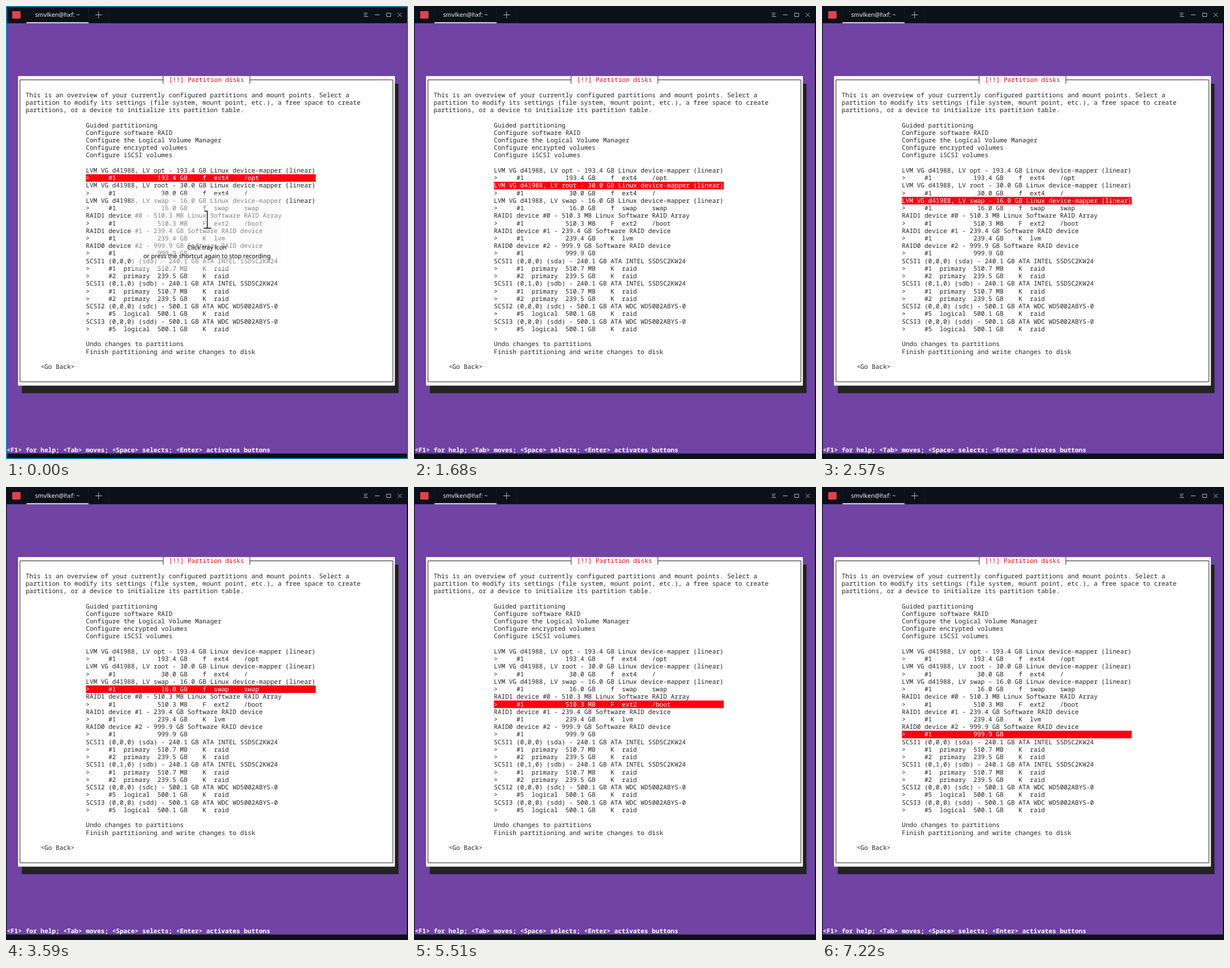
These frames come from a looping animation (706 px wide and 794 px high, 8 s). An HTML page:

```html
<!DOCTYPE html>
<html lang="en">
<head>
<meta charset="utf-8">
<title>Partition disks</title>
<style>
  html, body { margin: 0; width: 706px; height: 794px; overflow: hidden; background: #0c1018; }
  svg { display: block; }
  text { white-space: pre; text-rendering: geometricPrecision; }
  .mono text { font: 11.028px "Noto Sans Mono", "DejaVu Sans Mono", monospace; fill: #222; }
  .mono .title { fill: #f5000f; }
  .mono .help { font-weight: 700; fill: #fff; }
  .mono .on { fill: #fff; }
  .ui { font: 10.65px "Noto Sans", "Open Sans", sans-serif; }
  .icon { fill: none; stroke: #b4b7bc; stroke-width: 1; }
</style>
</head>
<body>
<svg id="stage" width="706" height="794" viewBox="0 0 706 794">
  <rect width="706" height="794" fill="#0c1018"/>

  <rect x="11" y="9" width="14.5" height="13" fill="#e5404c"/>
  <path d="M36.5 1V29M145.5 1V29M180.5 1V29" stroke="#161b24"/>
  <text class="ui" x="51" y="18.8" fill="#f2f2f2">smvlken@hxf: ~</text>
  <path class="icon" d="M157 15.5H169M162.5 9.5V21.5"/>
  <path class="icon" d="M628.5 12.5H635M628.5 15.5H634M628.5 18.5H636M648 15.5H656M668.5 12.5H675.5V18.5H668.5ZM688 12L695 19M695 12L688 19"/>

  <rect x="1.3" y="30.2" width="702.7" height="754.2" fill="#7043a5"/>
  <rect x="36" y="28.5" width="109" height="1.7" fill="#fff"/>

  <g id="term" class="mono"></g>

  <g id="hint">
    <rect x="221.5" y="330" width="263" height="133" rx="4" fill="#f8f8f8" fill-opacity=".45"/>
    <g class="ui" text-anchor="middle">
      <text x="353" y="427">Click tray icon</text>
      <text x="353" y="442">or press the shortcut again to stop recording</text>
    </g>
    <path id="halo" d="M348.5 359.5H353.5V389.5M347 389.5H360.5" fill="none" stroke="#fff" stroke-width="3"/>
    <path d="M348.5 359.5H353.5V389.5M347 389.5H360.5" fill="none" stroke="#000" stroke-width="1.4"/>
    <rect x=".75" y=".75" width="704.5" height="792.5" fill="none" stroke="#0a9bdc" stroke-width="1.5"/>
  </g>
</svg>
<script>
const LOOP = 8000, HINT_END = 50;
const CW = 6.617, CH = 13.234, X0 = 1.35, Y0 = 30.17, BASE = 10.3;
const LIST_COL = 21, LIST_ROW = 13, LIST_COLS = 61, FIRST = 20;
const MOVES = [1680, 2150, 2570, 3590, 4900, 5510, 5970, 6380, 6850, 7220];

const term = document.getElementById('term');
const hint = document.getElementById('hint');
const colX = c => X0 + c * CW;
const rowY = r => Y0 + r * CH;

function add(tag, attrs, content = '') {
  const el = document.createElementNS('http://www.w3.org/2000/svg', tag);
  for (const k in attrs) el.setAttribute(k, attrs[k]);
  el.textContent = content;
  term.append(el);
  return el;
}
const box = (col, row, cols, rows, fill) =>
  add('rect', { x: colX(col), y: rowY(row), width: cols * CW, height: rows * CH, fill });
const print = (col, row, str, cls = '') =>
  add('text', { x: colX(col), y: rowY(row) + BASE, class: cls }, str);

const part = (id, size, flag = '', fs = '', mount = '', kind = '') =>
  ('>     #' + id + '  ' + kind.padEnd(7) + size.padStart(10) + '    ' +
   flag.padEnd(3) + fs.padEnd(8) + mount).trimEnd();
const lvm = (name, size) => `LVM VG d41988, LV ${name} - ${size} Linux device-mapper (linear)`;
const ssd = (pos, dev) => [
  `SCSI1 (${pos}) (${dev}) - 240.1 GB ATA INTEL SSDSC2KW24`,
  part(1, '510.7 MB', 'K', 'raid', '', 'primary'),
  part(2, '239.5 GB', 'K', 'raid', '', 'primary')
];
const hdd = (bus, dev) => [
  `SCSI${bus} (0,0,0) (${dev}) - 500.1 GB ATA WDC WD5002ABYS-0`,
  part(5, '500.1 GB', 'K', 'raid', '', 'logical')
];

const list = [
  'Guided partitioning',
  'Configure software RAID',
  'Configure the Logical Volume Manager',
  'Configure encrypted volumes',
  'Configure iSCSI volumes',
  '',
  lvm('opt', '193.4 GB'), part(1, '193.4 GB', 'f', 'ext4', '/opt'),
  lvm('root', '30.0 GB'), part(1, '30.0 GB', 'f', 'ext4', '/'),
  lvm('swap', '16.0 GB'), part(1, '16.0 GB', 'f', 'swap', 'swap'),
  'RAID1 device #0 - 510.3 MB Linux Software RAID Array',
  part(1, '510.3 MB', 'F', 'ext2', '/boot'),
  'RAID1 device #1 - 239.4 GB Software RAID device',
  part(1, '239.4 GB', 'K', 'lvm'),
  'RAID0 device #2 - 999.9 GB Software RAID device',
  part(1, '999.9 GB'),
  ...ssd('0,0,0', 'sda'), ...ssd('0,1,0', 'sdb'),
  ...hdd(2, 'sdc'), ...hdd(3, 'sdd'),
  '',
  'Undo changes to partitions',
  'Finish partitioning and write changes to disk'
];

// Dialog with drop shadow and line-drawn frame
box(4, 8, 100, 41, '#232323');
box(3, 7, 100, 41, '#fff');
const left = colX(3.5), right = colX(102.5), top_ = rowY(7.5), bottom = rowY(47.5);
const tickL = colX(41.5), tickR = colX(64.5);
add('path', {
  d: `M${tickL} ${top_}H${left}V${bottom}H${right}V${top_}H${tickR}` +
     `M${tickL} ${rowY(7)}v${CH}M${tickR} ${rowY(7)}v${CH}`,
  fill: 'none', stroke: '#222', 'stroke-width': 1
});
print(43, 7, '[!!] Partition disks', 'title');

[
  'This is an overview of your currently configured partitions and mount points. Select a',
  'partition to modify its settings (file system, mount point, etc.), a free space to create',
  'partitions, or a device to initialize its partition table.'
].forEach((line, i) => print(5, 9 + i, line));

const bar = box(LIST_COL, FIRST, LIST_COLS, 1, '#ff000f');
const items = list.map((line, i) => print(LIST_COL, LIST_ROW + i, line));
print(9, 45, '<Go Back>');
print(0, 56, '<F1> for help; <Tab> moves; <Space> selects; <Enter> activates buttons', 'help');

let current = -1;
function draw() {
  const t = performance.now() % LOOP;
  const row = FIRST + MOVES.filter(m => m <= t).length;
  hint.style.display = t < HINT_END ? '' : 'none';
  if (row !== current) {
    current = row;
    bar.setAttribute('y', rowY(row));
    items.forEach((el, i) => el.classList.toggle('on', LIST_ROW + i === row));
  }
  requestAnimationFrame(draw);
}
draw();
</script>
</body>
</html>
```
